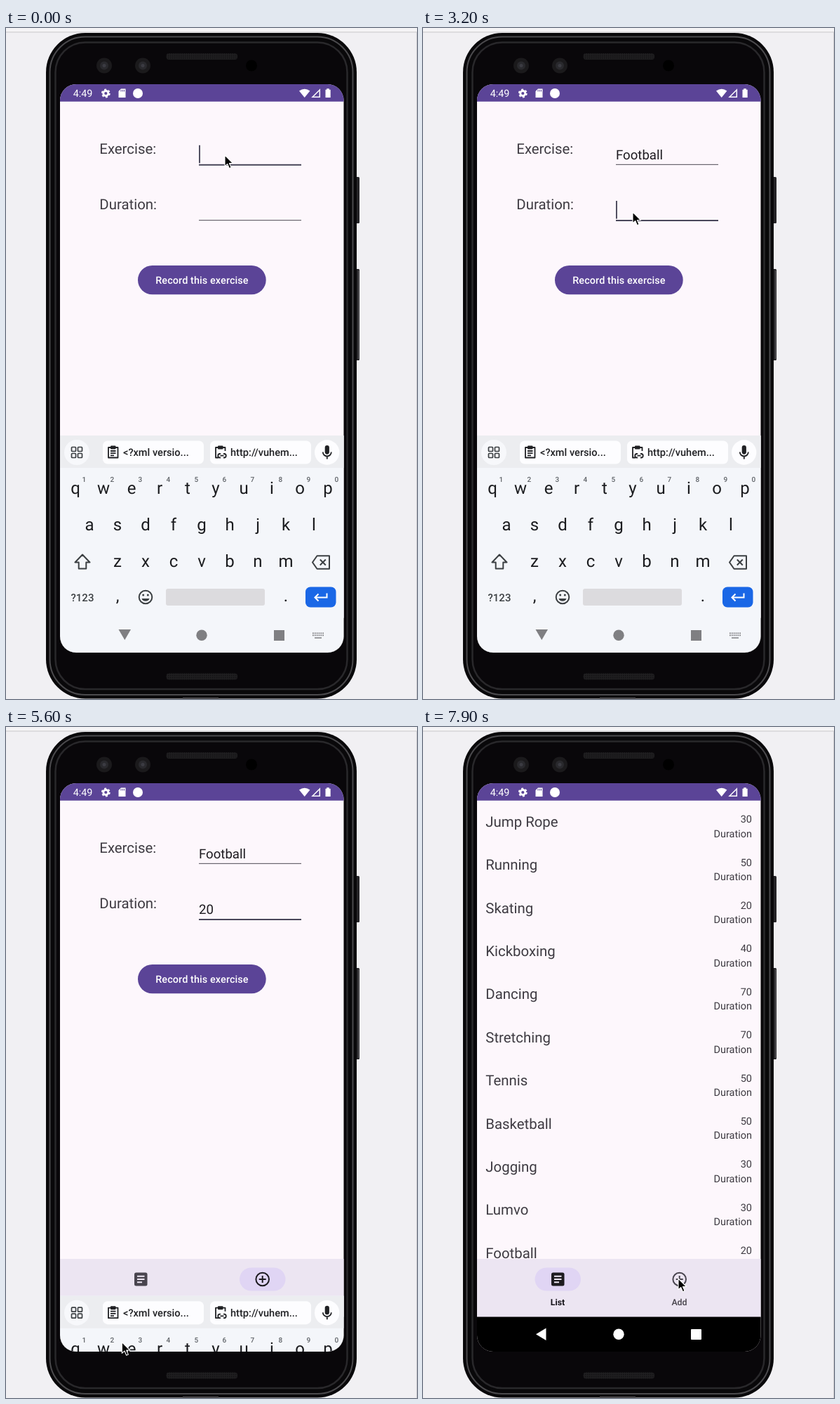
Write an HTML page that moves like this. It is 586x955 px and loops after 8 s.

```html
<!DOCTYPE html>
<html lang="en">
<head>
<meta charset="utf-8">
<title>Exercise log</title>
<style>
  html, body { margin: 0; width: 100%; height: 100%; overflow: hidden; background: #f1f0f3; }
  svg { display: block; width: 586px; height: 955px; font-family: Roboto, Arial, sans-serif; }
  text { white-space: pre; text-rendering: geometricPrecision; }
  .label { font-size: 20.4px; fill: #3e3b42; }
  .input { font-size: 18.6px; fill: #1d1b20; }
  .small { font-size: 14.5px; fill: #3e3b42; text-anchor: end; }
  .chip { font-size: 14.6px; font-weight: 500; fill: #202124; }
  .key { font-size: 24px; fill: #1b1c1f; text-anchor: middle; }
  .hint { font-size: 10px; font-weight: 500; fill: #5f6368; text-anchor: middle; }
  .tab { font-size: 12.4px; font-weight: 500; fill: #45414a; text-anchor: middle; }
  .tab.on { font-weight: 700; fill: #16141a; }
  .line { fill: none; stroke: #3c4043; stroke-width: 2; stroke-linejoin: round; }
</style>
</head>
<body>
<svg viewBox="0 0 586 955">
  <defs>
    <clipPath id="screen"><rect x="77" y="80" width="404.500" height="809" rx="23"/></clipPath>
    <clipPath id="page"><rect x="77" y="104" width="405" height="653"/></clipPath>
    <pattern id="mesh" width="3" height="3" patternUnits="userSpaceOnUse">
      <rect width="3" height="3" fill="#1f1e20"/><rect width="1.5" height="1.5" fill="#121113"/>
    </pattern>
  </defs>

  <rect width="586" height="955" fill="#f1f0f3"/>
  <rect width="586" height="5.500" fill="#f5f4f6"/>
  <rect y="5.400" width="586" height="1" fill="#c9c8cb"/>
  <rect x="585" y="6" width="1" height="949" fill="#d0cfd2"/>

  <!-- phone body -->
  <rect x="497" y="212" width="7" height="66" rx="1.500" fill="#252427"/>
  <rect x="497" y="343" width="7" height="130" rx="1.500" fill="#252427"/>
  <path d="M502.500 345V471" stroke="#626164"/>
  <rect x="57" y="7" width="443" height="947.500" rx="56" fill="#09080a"/>
  <rect x="62.500" y="12.500" width="432" height="936.500" rx="50.500" fill="none" stroke="#4b4a4d" stroke-width="2"/>
  <rect x="70.500" y="20.500" width="416" height="920.500" rx="42.500" fill="#09070a" stroke="#29282b" stroke-width="2.500"/>
  <rect x="252" y="952.800" width="51" height="2.200" fill="#4a494c"/>
  <rect x="228.500" y="36" width="101.500" height="9" rx="4" fill="url(#mesh)"/>
  <rect x="228.500" y="918.500" width="101.500" height="9" rx="4" fill="url(#mesh)"/>
  <g id="lenses"></g>
  <circle cx="350" cy="53.500" r="8" fill="#000"/>

  <g clip-path="url(#screen)">
    <rect x="77" y="80" width="405" height="809" fill="#fdf7fc"/>

    <g id="form">
      <text class="label" x="133.300" y="179">Exercise:</text>
      <text class="label" x="133.300" y="258.300">Duration:</text>
      <text class="input" id="name" x="275" y="186.800"></text>
      <text class="input" id="mins" x="275" y="266"></text>
      <rect id="line0" x="275" width="146"/>
      <rect id="line1" x="275" width="146"/>
      <rect id="caret" width="1.900" height="25.500" fill="#49475a"/>
      <rect x="188" y="338" width="182.700" height="41.300" rx="20.600" fill="#5b4497"/>
      <text x="279.500" y="364.200" text-anchor="middle" font-size="14.400" font-weight="500" letter-spacing=".1" fill="#fff">Record this exercise</text>
    </g>

    <g id="list" clip-path="url(#page)">
      <g id="rows"></g>
      <ellipse id="ripple" cx="280" cy="770" rx="135" ry="20" fill="#f1e8f6"/>
    </g>

    <!-- tabs and system buttons -->
    <rect x="77" y="757" width="405" height="83" fill="#ece5f2"/>
    <rect id="pill" y="769.500" width="65.500" height="33" rx="16.500" fill="#e0d5f4"/>
    <g id="listIcon">
      <rect x="183" y="776.500" width="18.500" height="19" rx="2.500"/>
      <path d="M187 781.700h10.500M187 786h10.500M187 790.300h7" stroke="#ece5f2" stroke-width="1.900"/>
    </g>
    <g id="addIcon" fill="none" stroke-width="2">
      <circle cx="365.700" cy="786" r="9.300"/><path d="M365.700 781v10M360.700 786h10"/>
    </g>
    <text class="tab" id="tab0" x="192" y="823">List</text>
    <text class="tab" id="tab1" x="365.500" y="823">Add</text>
    <rect x="77" y="839.500" width="405" height="50" fill="#000"/>
    <g fill="#fff">
      <path d="M161 864.300L175.500 855.500V873Z"/>
      <circle cx="279" cy="864.300" r="7.700"/>
      <rect x="382" y="857" width="15" height="15" rx="1"/>
    </g>

    <g id="keyboard">
      <rect x="77" y="580" width="405" height="310" fill="#f4f6fa"/>
      <rect x="77" y="580" width="405" height="46" fill="#ecedf0"/>
      <circle cx="101" cy="604" r="18" fill="#f7f8fb"/>
      <g id="grid" class="line" style="stroke-width:1.700"></g>
      <rect x="138" y="587.500" width="144" height="33" rx="7" fill="#fdfdff"/>
      <rect x="291" y="587.500" width="144" height="33" rx="7" fill="#fdfdff"/>
      <circle cx="457.700" cy="604" r="17.700" fill="#fdfdff"/>
      <g class="line" style="stroke:#202124;stroke-width:1.800">
        <path d="M146 597h13.500v14.500H146ZM149 602h7.500M149 605.200h7.500M149 608.400h5"/>
        <path d="M303 611.500h-4V597h13.500v5M306 606h-1a2.700 2.700 0 0 0 0 5.500h1M310 606h1a2.700 2.700 0 0 1 0 5.500h-1M305.500 608.700h5"/>
        <path d="M451.800 603.500a6 6 0 0 0 12 0M457.800 609.500v4"/>
      </g>
      <g fill="#202124">
        <rect x="149" y="594.500" width="7.500" height="5" rx="1"/>
        <rect x="302" y="594.500" width="7.500" height="5" rx="1"/>
        <rect x="454.700" y="594" width="6.200" height="12.700" rx="3.100"/>
      </g>
      <text class="chip" x="167" y="609">&lt;?xml versio...</text>
      <text class="chip" x="320" y="609">http://vuhem...</text>
      <g id="keys"></g>
      <path class="line" d="M109 749.500L98.500 760.500H103.700V769.500H114.300V760.500H119.500Z"/>
      <path class="line" d="M443.500 751.200H461V769.800H443.500L437 760.500ZM447.800 756.500l8 8M455.800 756.500l-8 8"/>
      <text x="109" y="815.500" text-anchor="middle" font-size="15" font-weight="500" fill="#3c4043">?123</text>
      <circle class="line" cx="199" cy="810" r="9.300"/>
      <path d="M193.500 812h11a5.700 5.200 0 0 1-11 0Z" fill="#3c4043"/>
      <g fill="#3c4043"><circle cx="195.700" cy="807" r="1.500"/><circle cx="202.300" cy="807" r="1.500"/></g>
      <rect x="228" y="798" width="141" height="24" rx="3" fill="#dcdbde"/>
      <rect x="427" y="795.500" width="43.500" height="29" rx="7" fill="#1a67e6"/>
      <path d="M457.500 804.500v6H440.500M445.500 805.500l-5 5 5 5" fill="none" stroke="#fff" stroke-width="2"/>
      <g fill="#7f7f82">
        <path d="M160.500 856H178L169.300 871Z"/>
        <circle cx="279" cy="864.300" r="7.700"/>
        <rect x="382" y="857" width="15" height="15"/>
      </g>
      <path d="M437 861.300h16M437 864.300h16" stroke="#7f7f82" stroke-width="1.700" stroke-dasharray="1.800 1.050"/>
      <path d="M440 868h10" stroke="#7f7f82" stroke-width="1.500"/>
    </g>

    <!-- status bar -->
    <rect x="77" y="80" width="405" height="24.700" fill="#5b4497"/>
    <g fill="#fff">
      <text x="95.700" y="98.200" font-size="14.400">4:49</text>
      <path d="M164 86.500h6.500v12.500H160.500V90Z"/>
      <circle cx="188" cy="93" r="7"/>
      <path d="M418 89.500q7.700-5.500 15.400 0L425.700 99Z"/>
      <path d="M455.500 87.700h1.700V86.300h3.600v1.400h1.900V99h-7.200Z"/>
    </g>
    <path d="M164 88v2.500M166.300 88v2.500M168.500 88v2.500" stroke="#5b4497"/>
    <g fill="none" stroke="#fff">
      <circle cx="142.300" cy="93" r="3.500" stroke-width="2.800"/>
      <circle cx="142.300" cy="93" r="5.500" stroke-width="1.800" stroke-dasharray="2.900 2.860"/>
      <path d="M437 98.300H447.300V88Z" stroke-width="1.500"/>
    </g>
  </g>

  <path id="mouse" d="M0 0V15.800L3.700 12.500 6.400 18.800 9.100 17.600 6.400 11.500H11.500Z" fill="#000" stroke="#fff" stroke-width="1.100" stroke-linejoin="round"/>
</svg>
<script>
const LOOP = 8000, STEP = 100;
const HIDE_AT = 5400, HIDE_MS = 300, LIST_AT = 6500, FOCUS_AT = 3000;

// time, x, y of the pointer tip
const path = [
  [0, 312, 181], [2500, 312, 181], [3000, 299, 262], [3700, 299, 262],
  [4100, 288.7, 337.3], [4300, 291, 350], [4500, 291, 350],
  [5200, 165.3, 875.5], [5600, 165.3, 875.5], [6200, 188.7, 806],
  [6400, 188.7, 806], [6900, 273, 558], [7200, 273, 558], [7900, 364, 785]
];
const typed = [..."Football"].map((c, i) => 1000 + i * 150);
const digits = [3500, 3800];
const resets = [-200, ...typed.map(t => Math.ceil(t / STEP) * STEP), FOCUS_AT, ...digits];

const exercises = [
  ["Jump Rope", 30], ["Running", 50], ["Skating", 20], ["Kickboxing", 40],
  ["Dancing", 70], ["Stretching", 70], ["Tennis", 50], ["Basketball", 50],
  ["Jogging", 30], ["Lumvo", 30], ["Football", 20]
];

const $ = id => document.getElementById(id);
const set = (el, attrs) => { for (const k in attrs) el.setAttribute(k, attrs[k]); };
const add = (parent, tag, attrs, text = "") => {
  const el = document.createElementNS("http://www.w3.org/2000/svg", tag);
  set(el, attrs);
  el.textContent = text;
  parent.append(el);
};

for (const cx of [140, 195]) {
  add($("lenses"), "circle", { cx, cy: 53.5, r: 11, fill: "#1b1a1c" });
  add($("lenses"), "circle", { cx, cy: 53.5, r: 6, fill: "#29292d" });
  add($("lenses"), "circle", { cx, cy: 53.5, r: 2.5, fill: "#3b3b42" });
}

for (let i = 0; i < 4; i++)
  add($("grid"), "rect", { x: 93.5 + (i % 2) * 9, y: 596.5 + (i >> 1) * 9, width: 6, height: 6, rx: 1 });

[["qwertyuiop", 99, 663], ["asdfghjkl", 119, 714.5], ["zxcvbnm", 159, 767]].forEach(([row, x0, y], r) => {
  [...row].forEach((c, i) => {
    const x = x0 + i * 40;
    add($("keys"), "text", { class: "key", x, y }, c);
    if (!r) add($("keys"), "text", { class: "hint", x: x + 12.3, y: 646 }, (i + 1) % 10);
  });
});
add($("keys"), "text", { class: "key", x: 159, y: 816 }, ",");
add($("keys"), "text", { class: "key", x: 399, y: 816 }, ".");

exercises.forEach(([name, mins], i) => {
  const y = i * 61.4;
  add($("rows"), "text", { class: "label", x: 89.3, y: y + 141.7 }, name);
  add($("rows"), "text", { class: "small", x: 469, y: y + 136.2 }, mins);
  add($("rows"), "text", { class: "small", x: 469, y: y + 156.5 }, "Duration");
});

const clamp = v => Math.min(1, Math.max(0, v));
const ease = v => v * v * (3 - 2 * v);
const count = (times, t) => times.filter(k => k <= t).length;

function pointer(t) {
  const i = path.findIndex(p => p[0] > t);
  if (i < 0) return path[path.length - 1].slice(1);
  const [a, b] = [path[i - 1], path[i]];
  const k = ease((t - a[0]) / (b[0] - a[0]));
  return [a[1] + (b[1] - a[1]) * k, a[2] + (b[2] - a[2]) * k];
}

function draw(t) {
  const second = t >= FOCUS_AT, listed = t >= LIST_AT;
  $("name").textContent = "Football".slice(0, count(typed, t));
  $("mins").textContent = "20".slice(0, count(digits, t));

  [!second, second].forEach((on, i) => set($("line" + i), {
    y: 193.8 + i * 79.2, height: on ? 2 : 1.2, fill: on ? "#49475a" : "#69666e"
  }));

  const field = $(second ? "mins" : "name");
  const width = field.textContent ? field.getComputedTextLength() : 0;
  const last = resets[count(resets, t) - 1];
  set($("caret"), {
    x: 275 + width, y: second ? 246 : 166.8,
    visibility: (t - last) % 1000 < 500 ? "inherit" : "hidden"
  });

  const drop = ease(clamp((t - HIDE_AT) / HIDE_MS));
  set($("keyboard"), { transform: `translate(0 ${drop * 310})`, visibility: drop < 1 ? "visible" : "hidden" });

  set($("form"), { visibility: listed ? "hidden" : "visible" });
  set($("list"), { visibility: listed ? "visible" : "hidden" });
  set($("ripple"), { opacity: clamp((7100 - t) / 400) });
  set($("pill"), { x: listed ? 159.5 : 333 });
  set($("listIcon"), { fill: listed ? "#1d1b20" : "#49454f" });
  set($("addIcon"), { stroke: listed ? "#49454f" : "#1d1b20" });
  $("tab0").classList.toggle("on", listed);
  $("tab1").classList.toggle("on", !listed);

  set($("mouse"), { transform: `translate(${pointer(t)})` });
}

const start = performance.now();
function tick() {
  const t = (performance.now() - start) % LOOP;
  draw(Math.floor(t / STEP) * STEP);
  requestAnimationFrame(tick);
}
tick();
</script>
</body>
</html>
```
